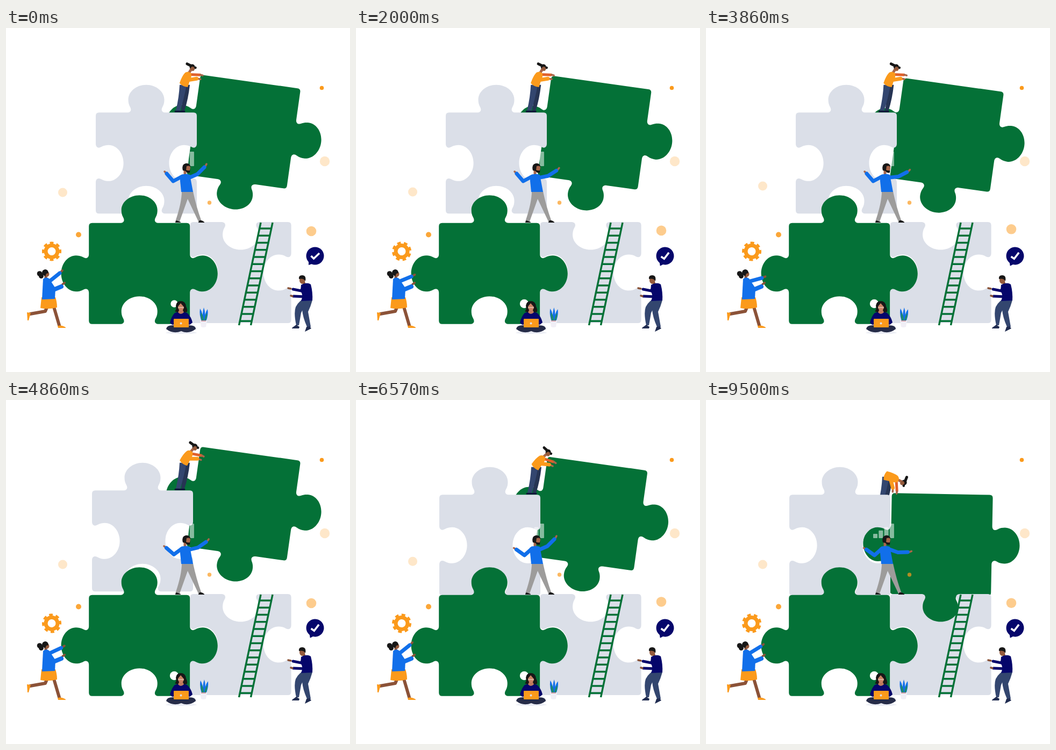
Recreate the animation shown at these times as an HTML page. Size 640x640 px, loop 9.57 s.

```html
<!DOCTYPE html>
<html>
<head>
<meta charset="utf-8">
<style>
  html, body { margin: 0; width: 100%; height: 100%; overflow: hidden; background: #fff; }
  svg { display: block; width: 100%; height: 100%; }
  .line { fill: none; stroke-linecap: round; stroke-linejoin: round; }
  .g { fill: #047137; } .p { fill: #dbdfe8; }
  .o { fill: #fb9a1c; } .b { fill: #116fea; } .n { fill: #05066b; }
  .k { fill: #171717; } .s { fill: #955a3c; } .t { fill: #33466f; }
</style>
</head>
<body>
<svg viewBox="0 0 640 640">
  <path id="lifted" class="g"/>

  <!-- woman on top: standing legs, upper body hinged at the hip -->
  <g id="legs">
    <path fill="#263453" d="M11 -51H22Q19 -24 12 -3H6Z"/>
    <path class="t" d="M3 -51H16Q11 -24 4 -3H-4Q2 -28 3 -51Z"/>
    <path class="line" stroke="#12123a" stroke-width="3" d="M-5 -1.500H3M5 -1.500H12"/>
  </g>
  <g id="climber" class="line">
    <path stroke="#e0602a" stroke-width="5" d="M3 -20L21 -27"/>
    <path stroke="#a9664a" stroke-width="3.500" d="M22 -27.500L26 -28M21 -19L25 -20"/>
    <path stroke="#a9664a" stroke-width="5" d="M1 -24L2 -31"/>
    <path class="o" d="M-8 2Q-9 -12 -6 -20Q-2 -26 5 -23Q9 -17 8 -8L9 3Q0 6 -8 2Z"/>
    <path stroke="#fb9a1c" stroke-width="7" d="M1 -18L7 -11 18 -18"/>
    <circle class="k" cx="2" cy="-35" r="5"/>
    <circle class="s" cx="4" cy="-32" r="4"/>
    <circle class="k" cx="8" cy="-36" r="2.300"/>
    <path stroke="#171717" stroke-width="5" d="M-9 -36.500L-1 -36"/>
  </g>

  <path id="upper" class="p"/>
  <path id="lower" class="p" transform="translate(436.600 455)"/>
  <path id="base" class="g" transform="translate(248.200 456.800)"/>
  <g id="bars" fill="#fff" opacity=".52"></g>
  <path id="ladder" fill="none" stroke="#047137" stroke-width="3.500"/>

  <!-- man in the middle -->
  <path fill="#9d9c9b" d="M327 304H348Q354 333 364 360H358L338 318 323 360H315Q327 325 327 304Z"/>
  <path class="k" d="M315 361L317 358 325 361V362H315ZM358 361L360 358Q364 357 369 361V362H358Z"/>
  <path class="line" stroke="#a9664a" stroke-width="5" d="M333 266V274"/>
  <path class="b" d="M323 275Q333 269 342 273L348 305H326Z"/>
  <g id="leftArm" class="line">
    <path stroke="#a9664a" stroke-width="3.500" d="M295 267L297 269"/>
    <path stroke="#116fea" stroke-width="7" d="M328 276L311 285 299 271"/>
  </g>
  <g id="rightArm" class="line">
    <path stroke="#a9664a" stroke-width="3.500" d="M371 257L373 253"/>
    <path stroke="#116fea" stroke-width="7" d="M340 279L356 272 369 259"/>
  </g>
  <path class="k" d="M329 265Q326 254 334 252Q341 251 343 257L342 269Q337 271 334 266Z"/>
  <path fill="#a9664a" d="M336 257Q343 255 343 260L342 265Q338 266 335 264Z"/>

  <!-- woman pushing on the left -->
  <path class="line" stroke="#8b5238" stroke-width="6" d="M76 520L73 527 45 532M89 519L99 553"/>
  <path class="o" d="M39 529L46 530 44 537 42 544H40ZM96 554Q104 552 111 557V558H97Z"/>
  <path class="o" d="M66 501H92Q95 510 95 520Q78 524 64 521Z"/>
  <path class="line" stroke="#8b5238" stroke-width="5" d="M74 458V467"/>
  <path class="b" d="M69 467Q74 462 80 466L92 484 91 504 67 505Z"/>
  <path class="line" stroke="#8b5238" stroke-width="4" d="M105 477L109 474"/>
  <path class="line" stroke="#116fea" stroke-width="8" d="M86 488L103 481"/>
  <g id="pushArm" class="line">
    <path stroke="#8b5238" stroke-width="4" d="M103 453L105 451"/>
    <path stroke="#116fea" stroke-width="7" d="M80 472L100 456"/>
  </g>
  <circle class="s" cx="75.500" cy="458" r="5"/>
  <path class="k" d="M67 458Q66 450 73 449Q79 450 79 456L75 457 73 462Z"/>
  <circle class="k" cx="62.500" cy="457" r="4.800"/>
  <circle class="k" cx="65.500" cy="461.500" r="4.500"/>

  <!-- man on the right -->
  <path class="t" d="M550 506L561 509Q553 521 549 530L545 553H540Q535 530 539 519Q543 511 550 506Z"/>
  <path class="t" d="M555 506H570Q567 518 562 528L567 556H560Q552 538 551 524Z"/>
  <path fill="#202c50" d="M532 558L540 552 546 556 545 559H532ZM556 565L559 556 565 555 568 559Z"/>
  <path class="line" stroke="#8a5337" stroke-width="5" d="M553 470L555 477"/>
  <path class="n" d="M549 478Q560 472 567 477Q571 492 570 507L549 508Q554 496 548 490Z"/>
  <path class="line" stroke="#05066b" stroke-width="5" d="M554 480L549 489 534 486M559 500L535 499"/>
  <path class="line" stroke="#8a5337" stroke-width="3.500" d="M525 484L530 485M530 498L533 499"/>
  <ellipse class="s" cx="551" cy="469" rx="5" ry="7"/>
  <path class="k" d="M545 467Q544 460 551 460Q559 460 557 471Q554 465 545 467Z"/>

  <!-- woman with laptop -->
  <circle id="thought" cx="313" cy="513" fill="#fff"/>
  <ellipse cx="326" cy="567" rx="29" ry="2" fill="#e9ebf3"/>
  <path fill="#262c48" d="M298 560Q299 552 313 553H340Q353 553 353 560Q340 570 326 564Q311 570 298 560Z"/>
  <path class="k" d="M325 508Q334 508 335 518Q338 524 337 528Q325 533 314 527Q318 524 316 517Q317 508 325 508Z"/>
  <path class="n" d="M314 530Q325 526 337 530Q345 538 347 548L342 552H309L305 548Q308 536 314 530Z"/>
  <path fill="#c07a5c" d="M320 529L323 523H328L331 529Q325 535 320 529Z"/>
  <ellipse cx="325.500" cy="519" rx="5.500" ry="7" fill="#c98263"/>
  <path class="k" d="M317 520Q317 509 325 509Q334 510 334 520L331 519 325 512 320 518Z"/>
  <path fill="none" stroke="#f3e5dc" d="M320 520H331"/>
  <rect class="o" x="312" y="541" width="28" height="16" rx="1"/>
  <circle cx="325.500" cy="549.500" r="2" fill="#dbdfe8"/>

  <!-- plant -->
  <g id="leaves">
    <path class="b" d="M364 546Q359 533 361 522Q367 531 367 546ZM366 546Q365 530 368 520Q372 531 369 546ZM369 546Q369 531 375 523Q377 534 372 546Z"/>
    <path fill="#1f8a68" d="M365 546Q361 537 363 529Q368 537 368 546ZM369 546Q370 535 374 530Q375 537 371 546Z"/>
  </g>
  <path fill="#f1eff6" d="M361 544H374L372 556Q367 558 363 556Z"/>
  <path fill="none" stroke="#a94d5c" d="M363 545H372"/>

  <!-- gear and tick -->
  <g id="gear" fill="none" stroke="#fb9a1c">
    <circle r="11" stroke-width="7"/>
    <circle r="15.500" stroke-width="5" pathLength="16" stroke-dasharray="1.100 .9" stroke-dashoffset=".55"/>
  </g>
  <g id="tick">
    <circle class="n" r="16.500"/>
    <path class="n" d="M-12 8V17L-3 14Z"/>
    <path fill="none" stroke="#fff" stroke-width="3.600" d="M-7.500 0L-2.500 5 8-5"/>
  </g>
  <g class="o">
    <circle cx="587.500" cy="111.500" r="3.800"/>
    <circle cx="593" cy="248" r="9.200" opacity=".24"/>
    <circle id="dotLeft" cx="105.500" r="8.500" opacity=".24"/>
    <circle id="dotRight" cx="568" r="9.300" opacity=".5"/>
    <circle id="dotSmall" cx="135" r="5" opacity=".88"/>
    <circle cx="378.500" cy="325" r="3.700" opacity=".7"/>
  </g>
</svg>
<script>
const LOOP = 9570;
const el = id => document.getElementById(id);
const set = (id, name, value) => el(id).setAttribute(name, value);
const move = (id, x, y, angle = 0) =>
  set(id, 'transform', `translate(${x} ${y}) rotate(${angle})`);
const turn = (id, angle, x, y) => set(id, 'transform', `rotate(${angle} ${x} ${y})`);

// Sides run clockwise from the top: 1 tab, -1 notch, 0 flat.
function piece(...sides) {
  return 'M-88 -94' + sides.map((side, quarter) => {
    const at = (...n) => {
      let out = '';
      for (let i = 0; i < n.length; i += 2) {
        let [x, y] = [n[i], n[i + 1]];
        for (let j = 0; j < quarter; j++) [x, y] = [-y, x];
        out += ` ${x} ${y}`;
      }
      return out;
    };
    const h = d => -94 - side * d;
    const knob = side ? 'L' + at(-36, -94) + 'C' + at(
      -29, -94, -27, h(5), -30, h(10), -33, h(15), -33.5, h(20), -33.5, h(24),
      -33.5, h(39), -18.5, h(51.6), 0, h(51.6), 18.5, h(51.6), 33.5, h(39), 33.5, h(24),
      33.5, h(20), 33, h(15), 30, h(10), 27, h(5), 29, -94, 36, -94) : '';
    return knob + 'L' + at(88, -94) + 'Q' + at(94, -94, 94, -88);
  }).join('') + 'Z';
}

// Progress 0..1 between two times, and a 0..1..0 wave of a given period.
const ramp = (t, from, to) => Math.min(1, Math.max(0, (t - from) / (to - from)));
const ease = (t, from, to) => { const u = ramp(t, from, to); return u * u * (3 - 2 * u); };
const cycle = (t, period) => (1 - Math.cos(2 * Math.PI * t / period)) / 2;

function frame(now) {
  const t = (now - start) % LOOP;
  const wave = cycle(t, 2430);
  const strain = cycle(t, 6600);
  const settle = ease(t, 4000, 5550);
  const slide = ease(t, 4860, 6570);
  const drop = ease(t, 6570, 8050);
  const push = t < 4860 ? wave : 0;

  const upperY = 251.3 + 19 * settle;
  move('upper', 261 - 12 * settle, upperY);
  move('lifted', 442 + 6.5 * push - 5.5 * slide + 1.4 * drop,
    193 + 6.6 * push + 18.5 * slide + 57.3 * drop, 8 - 6.9 * drop);

  const footX = 320 + 8 * push + 3 * slide + 2 * drop;
  const footY = upperY - 94.5 + 18 * drop;
  move('legs', footX, footY);
  move('climber', footX + 11, footY - 53, 23 + 16 * settle + 69 * drop);

  turn('leftArm', -14 * settle, 328, 277);
  turn('rightArm', 19 * strain + 25 * ease(t, 6570, 9000), 342, 279);
  turn('pushArm', 25 * strain * (1 - .7 * drop), 80, 470);

  const start01 = ease(t, 0, 900);
  move('gear', 85, 415.5, t * .036);
  move('tick', 575, 424, -9 * start01);
  set('thought', 'r', 6.7 + 1.5 * start01);
  turn('leaves', 2 * cycle(t, LOOP), 368, 546);
  set('dotLeft', 'cy', 306 - 14 * wave * wave);
  set('dotRight', 'cy', 378 - 4 * wave);
  set('dotSmall', 'cy', 384.5 - 15 * Math.sin(Math.PI * ramp(t, 7000, 8300)));
  requestAnimationFrame(frame);
}

set('lifted', 'd', piece(0, 1, 1, 1));
set('upper', 'd', piece(1, -1, -1, -1));
set('lower', 'd', piece(-1, -1, 0, -1));
set('base', 'd', piece(1, 1, -1, 1));

let rails = 'M474 362L433.5 553M496 362L455.5 553', bars = '';
for (let y = 373; y < 550; y += 13.25) rails += `M${474 - (y - 362) * .212} ${y}h21`;
for (let i = 0; i < 4; i++) {
  const height = 8 + i * 6.3;
  bars += `<rect x="${311 + i * 10.3}" y="${257 - height}" width="8" height="${height}" rx="1"/>`;
}
set('ladder', 'd', rails);
el('bars').innerHTML = bars;
const start = performance.now();
frame(start);
</script>
</body>
</html>
```
